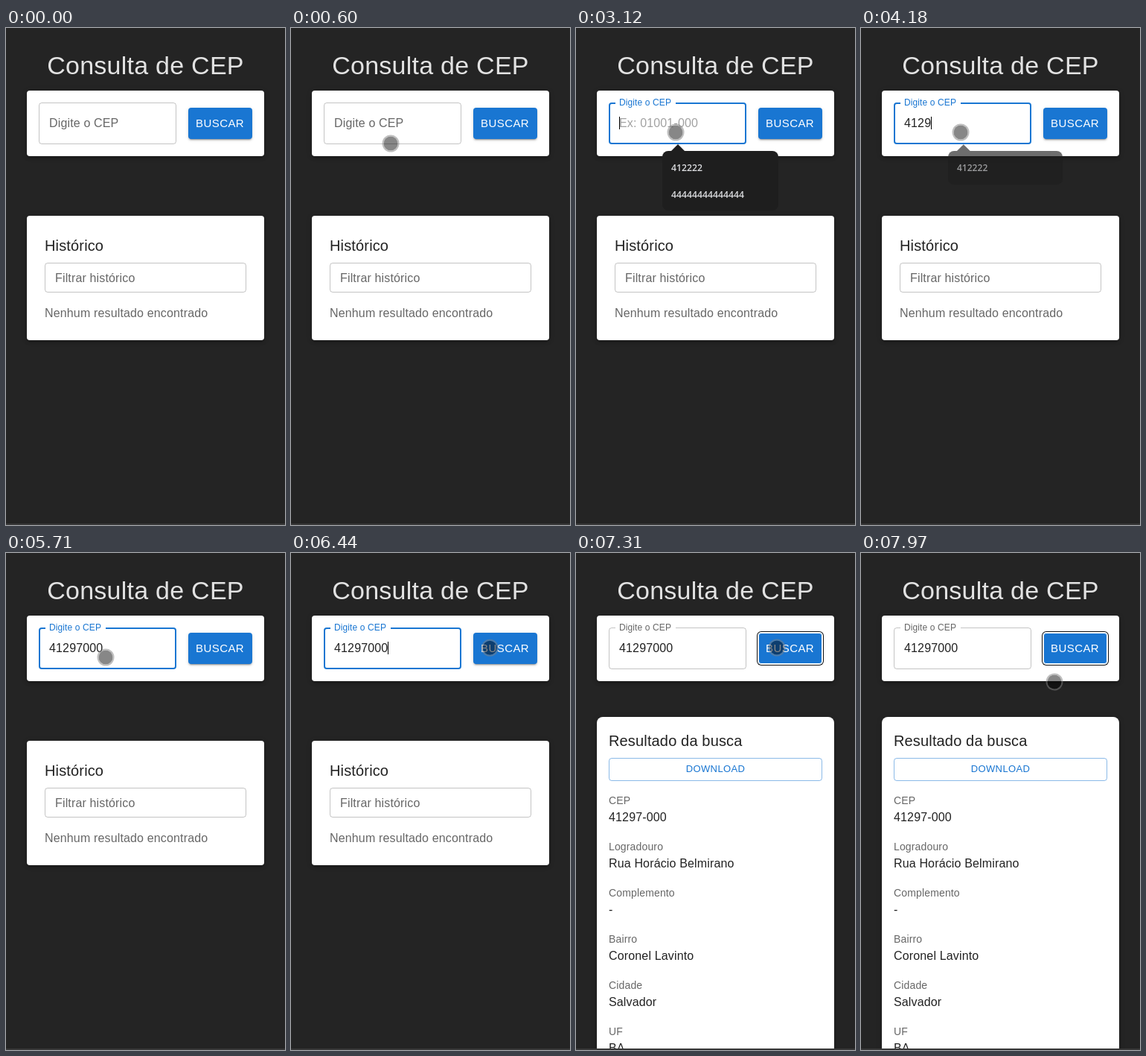
These frames come from a looping animation (375x667 px, 8 s). An HTML page:

```html
<!DOCTYPE html>
<html lang="pt-BR">
<head>
<meta charset="utf-8">
<title>Consulta de CEP</title>
<style>
  * { box-sizing: border-box; margin: 0; }
  html, body { width: 100%; height: 100%; overflow: hidden; background: #242424; }
  body { position: relative; font: 16px/24px "Liberation Sans", Arial, sans-serif; letter-spacing: .00938em; color: rgba(0,0,0,.87); }
  body *, .card { position: absolute; white-space: pre; }
  h1 { left: 0; top: 29px; width: 375px; font: 400 34px/42px "Liberation Sans", Arial, sans-serif; letter-spacing: .00735em; text-align: center; color: rgba(255,255,255,.87); }
  h2 { font-weight: 400; font-size: 20px; line-height: 32px; letter-spacing: .0075em; }
  .card { left: 28px; width: 319px; background: #fff; border-radius: 4px; box-shadow: 0 3px 3px -2px rgba(0,0,0,.2), 0 3px 4px rgba(0,0,0,.14), 0 1px 8px rgba(0,0,0,.12); }
  .box { border: 1px solid rgba(0,0,0,.23); border-radius: 4px; }
  .in { line-height: 23px; }
  .grey { color: rgba(0,0,0,.6); }
  #field { left: 16px; top: 16px; width: 185px; height: 56px; }
  #field.on { border: 2px solid #1976d2; }
  #notch { left: 25px; top: 15px; height: 4px; background: #fff; }
  #label { left: 0; top: 0; transform-origin: 0 0; }
  #hint, #value { left: 30px; top: 32px; }
  #caret { top: 35px; width: 1px; height: 17px; background: #000; }
  #btn { left: 217px; top: 23px; width: 86px; height: 42px; overflow: hidden; border-radius: 4px; background: #1976d2; color: #fff; font-size: 15px; line-height: 42px; letter-spacing: .02857em; text-align: center; box-shadow: 0 3px 1px -2px rgba(0,0,0,.2), 0 2px 2px rgba(0,0,0,.14), 0 1px 5px rgba(0,0,0,.12); }
  #btn.on { box-shadow: inset 0 0 0 1px #fff, 0 0 0 1px #fff, 0 0 0 2px #101010; }
  #btn span { left: 10px; top: 0; }
  #ripple { left: -46px; top: -50px; width: 140px; height: 140px; border-radius: 50%; background: #fff; }
  #popup { left: 116px; top: 165px; width: 156px; border-radius: 8px; background: #1e1e1e; color: #dcdde0; font: 600 12.25px/20px "Open Sans", "Noto Sans", sans-serif; letter-spacing: 0; transform-origin: 50% 0; }
  #popup i { left: 12px; top: -9px; border: solid transparent; border-width: 0 9px 9px; border-bottom-color: #1e1e1e; }
  #popup span { left: 12px; top: 13px; }
  #popup #second { top: 49px; }
  #result { top: 220px; height: 600px; border-radius: 8px; }
  #download { left: 16px; top: 55px; width: 287px; height: 31px; border: 1px solid rgba(25,118,210,.5); border-radius: 4px; color: #1976d2; font-size: 13px; line-height: 28px; letter-spacing: .02857em; text-align: center; }
  #result .name { left: 16px; font-size: 14px; line-height: 20px; letter-spacing: .01071em; }
  #result .data { left: 16px; }
  #strip { left: 0; top: 665px; width: 375px; height: 2px; background: #383838; }
  #cursor { left: -11.5px; top: -11.5px; width: 23px; height: 23px; border-radius: 50%; background: rgba(0,0,0,.47); background-clip: padding-box; border: 2px solid rgba(128,128,128,.5); }
</style>
</head>
<body>
<h1>Consulta de CEP</h1>

<div class="card" style="top:84px;height:88px">
  <div id="field" class="box"></div>
  <div id="notch"></div>
  <span id="label" class="in">Digite o CEP</span>
  <span id="hint" class="in">Ex: 01001-000</span>
  <span id="value" class="in"></span>
  <div id="caret"></div>
  <div id="btn"><span>BUSCAR</span><div id="ripple"></div></div>
</div>

<div id="history" class="card" style="top:252px;height:167px">
  <h2 style="left:24px;top:24px">Histórico</h2>
  <div class="box" style="left:24px;top:63px;width:271px;height:40px"></div>
  <span class="in grey" style="left:38px;top:72px">Filtrar histórico</span>
  <span class="grey" style="left:24px;top:119px">Nenhum resultado encontrado</span>
</div>

<div id="result" class="card">
  <h2 style="left:16px;top:16px">Resultado da busca</h2>
  <div id="download">DOWNLOAD</div>
</div>

<div id="popup"><i></i><span>412222</span><span id="second">44444444444444</span></div>
<div id="strip"></div>
<div id="cursor"></div>

<script>
const LOOP = 8000, FOCUS = 1130, BLUR = 6640, RESULT = 7310;
const CODE = "41297000";
const KEYS = [3380, 3580, 3980, 4110, 4310, 4710, 4980, 5180];
const CARET_OFF = [[1660, 2120], [2580, 3120], [5710, 6240]];
// time, x, y
const PATH = [
  [130, 356.5, 650.5], [600, 133.5, 154.5], [750, 130, 138], [930, 133.5, 139.5],
  [5800, 133.5, 139.5], [6500, 269.5, 126.5], [7890, 269.5, 126.5], [7970, 259.5, 172.5]
];
const FIELDS = [
  ["CEP", "41297-000"], ["Logradouro", "Rua Horácio Belmirano"], ["Complemento", "-"],
  ["Bairro", "Coronel Lavinto"], ["Cidade", "Salvador"], ["UF", "BA"]
];

const $ = id => document.getElementById(id);
const show = (id, on) => { $(id).style.display = on ? "" : "none"; };
const ramp = (t, a, b) => Math.min(1, Math.max(0, (t - a) / (b - a)));
const easeOut = p => 1 - (1 - p) ** 2.5;
const smooth = p => p * p * (3 - 2 * p);
const mix = (a, b, p) => a + (b - a) * p;

function addText(cls, top, text) {
  const el = document.createElement("span");
  el.className = cls;
  el.style.top = top + "px";
  el.textContent = text;
  $("result").append(el);
}
FIELDS.forEach(([name, data], i) => {
  const top = 102 + i * 61.9;
  addText("name grey", top, name);
  addText("data", top + 21, data);
});

function cursorAt(t) {
  const i = PATH.findIndex(k => k[0] > t);
  if (i < 0) return PATH[PATH.length - 1].slice(1);
  const [t0, x0, y0] = PATH[i - 1], [t1, x1, y1] = PATH[i];
  const p = (i === 1 ? easeOut : smooth)(ramp(t, t0, t1));
  return [mix(x0, x1, p), mix(y0, y1, p)];
}

function draw(t) {
  const focused = t >= FOCUS && t < BLUR;
  const typed = KEYS.filter(k => k <= t).length;

  const up = easeOut(ramp(t, FOCUS, FOCUS + 190));
  const tint = ramp(t, FOCUS, FOCUS + 190) - ramp(t, BLUR, BLUR + 200);
  $("field").classList.toggle("on", focused);
  $("notch").style.width = 81 * up + "px";
  $("label").style.transform = `translate(30px, ${mix(32, 7, up)}px) scale(${mix(1, .75, up)})`;
  $("label").style.color = `rgba(${25 * tint}, ${118 * tint}, ${210 * tint}, ${mix(.6, 1, tint)})`;
  $("hint").style.opacity = typed ? 0 : .42 * up;
  $("value").textContent = CODE.slice(0, typed);
  $("caret").style.left = 30 + typed * 9.05 + "px";
  show("caret", focused && !CARET_OFF.some(([a, b]) => t >= a && t < b));

  const fade = ramp(t, 1180, 1320) - ramp(t, 4110, 4310);
  const popup = $("popup").style;
  popup.opacity = fade;
  popup.height = (typed < 2 ? 80 : 46) + "px";
  popup.transform = `scale(${mix(.96, 1, fade)})`;
  show("second", typed < 2);

  $("btn").classList.toggle("on", t >= BLUR);
  $("ripple").style.transform = `scale(${easeOut(ramp(t, 6580, 6900))})`;
  $("ripple").style.opacity = t < 6580 ? 0 : .3 * (1 - ramp(t, 6700, 6980));

  show("history", t < RESULT);
  show("result", t >= RESULT);

  show("cursor", t >= PATH[0][0]);
  if (t >= PATH[0][0]) {
    const [x, y] = cursorAt(t);
    $("cursor").style.transform = `translate(${x}px, ${y}px)`;
  }
}

function tick() {
  draw(performance.now() % LOOP);
  requestAnimationFrame(tick);
}
tick();
</script>
</body>
</html>
```
